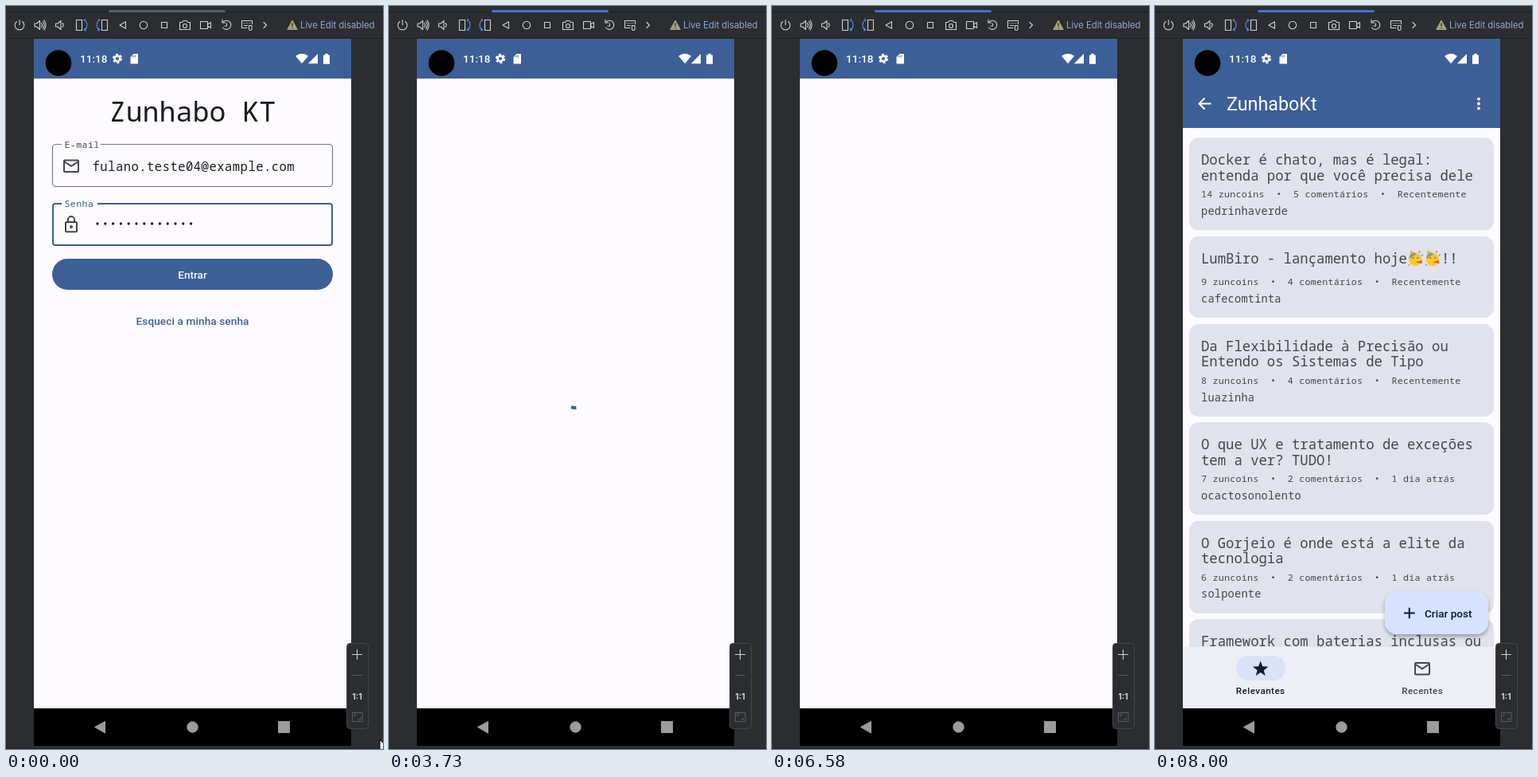
Recreate the animation shown at these times as an HTML page. Size 474 by 932 pixels, loop 9.45 s.

```html
<!DOCTYPE html>
<html lang="pt-BR">
<head>
<meta charset="utf-8">
<title>Zunhabo KT</title>
<style>
  html, body { margin: 0; width: 100%; height: 100%; overflow: hidden; background: #2b2d30; }
  svg { display: block; width: 474px; height: 932px; }
  text { white-space: pre; font: 500 13.6px Roboto, sans-serif; }
  .mid { text-anchor: middle; }
  .mono { font-family: "Noto Sans Mono", "DejaVu Sans Mono", monospace; font-weight: 400; }
  .label { font-size: 11.64px; letter-spacing: .39px; }
  .tab { font-size: 11.64px; letter-spacing: .45px; }
  .headline { font-size: 17.27px; }
  .meta { font-size: 11.64px; letter-spacing: .28px; }
  .author { font-size: 13.6px; letter-spacing: .24px; }
  .ide { font-family: Inter, sans-serif; font-weight: 400; }
  .line { fill: none; stroke: #ced0d6; stroke-width: 1.1; stroke-linejoin: round; stroke-linecap: round; }
  .blue { stroke: #548af7; }
</style>
</head>
<body>
<svg viewBox="0 0 474 932">
  <defs>
    <clipPath id="listArea"><rect x="35" y="153" width="399" height="651"/></clipPath>
    <filter id="shadow" x="-20%" y="-30%" width="140%" height="180%">
      <feDropShadow dx="0" dy="3" stdDeviation="2.6" flood-opacity=".3"/>
    </filter>
    <g id="mail" fill="none" stroke="#44474e" stroke-width="2" stroke-linejoin="round">
      <rect x="-9" y="-7" width="18" height="14.4" rx="1"/>
      <path d="M-9-5.5 0 .4 9-5.5"/>
    </g>
    <g id="party">
      <circle cx="10" cy="1.5" r="8.2" fill="#ffca28"/>
      <path d="M2 1 4-10 12-5Z" fill="#f5a33b"/>
      <path d="M2.7-3 9-7 11-5.6 2.3-.4Z" fill="#36a9d8"/>
      <path d="M5.5 0q1.6-2 3 0m3 0q1.6-2 3 0" fill="none" stroke="#6d4c28"/>
      <path d="M10 5 18 2.5 18.5 6.5Z" fill="#e8523f"/>
      <circle cx="15" cy="-8" r="1.1" fill="#e8523f"/>
      <circle cx="18.5" cy="-4" r="1" fill="#36a9d8"/>
      <circle cx="2" cy="8.5" r="1" fill="#7cb342"/>
    </g>
  </defs>

  <!-- IDE chrome -->
  <rect width="474" height="932" fill="#2b2d30"/>
  <path d="M0 7.5H474M0 40.5H474M0 931.5H474" stroke="#1e1f22"/>
  <rect id="focusBar" x="129" y="5" width="147" height="3" rx="1.5"/>
  <g class="line">
    <path d="M17 17.5v6M13.5 19.5a5.8 5.8 0 1 0 7 0"/>
    <path d="M36 22h2.5l4-3.5v11l-4-3.5H36ZM44.5 21.5q2 2.5 0 5M46.3 19.5q3.6 4.5 0 9M48 17.8q4 6.2 0 12.4"/>
    <path d="M62.5 22H65l4-3.5v11L65 26h-2.5ZM71 21.5q2.4 2.5 0 5"/>
    <path d="M88.500 17.500h7v13h-7Z"/>
    <path class="blue" d="M98 18q4 1 4 6t-4 6m0 0 2.500-2.500M98 30l2.500 1M98 18l2-1.500"/>
    <path d="M120.500 17.500h7v13h-7Z"/>
    <path class="blue" d="M118 18q-4 1-4 6t4 6m0 0-2.500-2.500M118 30l-2.500 1M118 18l-2-1.500"/>
    <path d="M143 24l7.500-4.200v8.400Z"/>
    <circle cx="173" cy="24" r="4.700"/>
    <path d="M195.500 20.500h7v7h-7Z"/>
    <path d="M218.500 20.500h3l1.500-2h4l1.500 2h3v9h-13Z"/>
    <circle cx="225" cy="25" r="2.500"/>
    <path d="M244.500 19.500h9v9h-9ZM253.500 23l4-2.500v7l-4-2.500"/>
    <path d="M273 20a5.600 5.600 0 1 1-.5 7M272 17v4h4M277.500 22v3h-2.500"/>
    <path d="M303 27.500h-6.500v-9h13v4M299 21.500h.2m2.300 0h.2m2.300 0h.2m2.300 0h.2M299.500 24.500h4M305.500 24.500h3.500v5q-1.700 2-3.500 0Z"/>
    <path d="M324 20.500l3.500 3.500-3.500 3.500"/>
  </g>
  <path d="M360 18 366.300 29.500H353.700Z" fill="#a3a17e" stroke="#a3a17e" stroke-linejoin="round"/>
  <path d="M360 21.500v4M360 27v1.300" stroke="#2b2d30" stroke-width="1.300"/>
  <text class="ide" x="370" y="28" style="font-size:11.3px" fill="#8fa9d6">Live Edit disabled</text>

  <!-- Phone -->
  <rect x="35" y="41" width="399" height="887"/>
  <rect x="35" y="91" width="399" height="790" fill="#fdfbff"/>
  <rect x="35" y="41" width="399" height="50" fill="#3d5f97"/>
  <circle cx="66" cy="71.500" r="16.300"/>
  <g fill="#fff">
    <text x="93" y="71">11:18</text>
    <g fill="none" stroke="#fff">
      <circle cx="140" cy="66" r="3.400" stroke-width="2.600"/>
      <circle cx="140" cy="66" r="5" stroke-width="2.400" stroke-dasharray="2.800 2.436"/>
    </g>
    <path d="M160.500 60h5.500v12.500h-9.500v-8.500Z"/>
    <path d="M372 72.200 364 62.800q8-6 16 0Z"/>
    <path d="M392 60v12.200h-12.200Z"/>
    <path d="M399 61.500h2.300v-1.700h3.400v1.700h2.300v11.200h-8Z"/>
  </g>
  <path d="M158.700 62.500v2m2-3v3m2-3v3" stroke="#3d5f97" stroke-width=".8"/>
  <g fill="#9c9c9c" stroke="#9c9c9c" stroke-linejoin="round">
    <path d="M111.500 904.500 124.500 897.500v14.500Z"/>
    <circle cx="234.500" cy="904.500" r="6.700"/>
    <rect x="342.500" y="897.500" width="14" height="14"/>
  </g>

  <g id="login">
    <text class="mono mid" x="234.500" y="144.500" style="font-size:34.95px" fill="#1b1b1f">Zunhabo KT</text>
    <rect x="58.500" y="173.500" width="352" height="53" rx="4" fill="none" stroke="#74777f" stroke-width="1.100"/>
    <path d="M70 173.500h49M70 248h45" stroke="#fdfbff" stroke-width="4"/>
    <text class="mono label" x="73.500" y="178" fill="#44474e">E-mail</text>
    <use href="#mail" x="82" y="200.500"/>
    <text class="mono" x="108.500" y="206.500" style="font-size:15.53px;letter-spacing:.485px" fill="#1b1b1f">fulano.teste04@example.com</text>
    <path d="M70 248h-8q-3 0-3 3v46q0 3 3 3h345q3 0 3-3v-46q0-3-3-3H115" fill="none" stroke="#3d5f97" stroke-width="2"/>
    <text class="mono label" x="73.500" y="252" fill="#3d5f97">Senha</text>
    <g fill="none" stroke="#44474e" stroke-width="2">
      <rect x="75" y="271" width="14" height="12.300" rx="1"/>
      <path d="M78 271v-3a4 4 0 0 1 8 0v3"/>
      <circle cx="82" cy="277" r="1"/>
    </g>
    <path d="M115 273h118" stroke="#1b1b1f" stroke-width="3.300" stroke-linecap="round" stroke-dasharray="0 9.800"/>
    <rect id="caret" x="235.500" y="262" width="2" height="22" fill="#3d5f97"/>
    <rect x="58" y="317" width="353" height="39" rx="19.500" fill="#3d5f97"/>
    <text class="mid" x="234.500" y="342" fill="#fff">Entrar</text>
    <text class="mid" x="234.500" y="400" fill="#3d5f97" letter-spacing=".1">Esqueci a minha senha</text>
  </g>

  <path id="spinner" fill="none" stroke="#3d5f97" stroke-width="3.900"/>

  <g id="home">
    <rect x="35" y="90" width="399" height="63" fill="#3d5f97"/>
    <path d="M70.500 122.500H56M62.500 115.500l-7 7 7 7" fill="none" stroke="#fff" stroke-width="2"/>
    <text x="90" y="131" style="font-size:23.3px;font-weight:400" fill="#fff">ZunhaboKt</text>
    <path d="M407 116.600v12" stroke="#fff" stroke-width="3.900" stroke-linecap="round" stroke-dasharray="0 5.900"/>
    <g clip-path="url(#listArea)"><g id="cards" fill="#44474e"></g></g>
    <rect x="35" y="804" width="399" height="77" fill="#edeef6"/>
    <rect x="102" y="815" width="62" height="31" rx="15.500" fill="#dae2f9"/>
    <path id="star" fill="#131c2b"/>
    <text class="mid tab" x="132.700" y="863" fill="#1b1b1f">Relevantes</text>
    <use href="#mail" x="336" y="831"/>
    <text class="mid tab" x="336.200" y="863" fill="#44474e">Recentes</text>
    <rect x="289" y="734" width="130" height="54" rx="15.500" fill="#d7e2ff" filter="url(#shadow)"/>
    <path d="M313 761.500h13.600M319.800 754.700v13.600" stroke="#001b3f" stroke-width="2"/>
    <text x="339" y="766.500" fill="#001b3f">Criar post</text>
  </g>

  <!-- Zoom panel -->
  <rect x="428.500" y="799.500" width="27" height="107" rx="4" fill="#2b2d30" stroke="#43454a"/>
  <path class="line" d="M435.500 813.500h12M441.500 807.500v12"/>
  <path d="M435.500 839.500h12M435.500 886.500h12.500v11h-12.500ZM438 891.500v-2.500h3M445.500 892.500v2.500h-3" fill="none" stroke="#5a5d63"/>
  <text class="ide mid" x="441.500" y="870" style="font-size:10.5px;font-weight:700" fill="#ced0d6">1:1</text>

  <path id="cursor" d="M0 0v15.500l3.600-3.300 2.600 6 2.700-1.200-2.600-5.800h5Z" fill="#fff" stroke="#111" stroke-width="1.100"/>
</svg>
<script>
const LOOP = 9450;
const LOADING_AT = 2510, BLANK_AT = 6580, HOME_AT = 6710, CARDS_AT = 7500;
const $ = id => document.getElementById(id);
const show = (id, on) => { $(id).style.display = on ? '' : 'none'; };
const clamp = x => Math.min(1, Math.max(0, x));

// Material standard easing: cubic-bezier(.4, 0, .2, 1)
function ease(x) {
  x = clamp(x);
  let lo = 0, hi = 1;
  for (let i = 0; i < 20; i++) {
    const s = (lo + hi) / 2, r = 1 - s;
    if (1.2 * r * r * s + .6 * r * s * s + s ** 3 < x) lo = s; else hi = s;
  }
  return 3 * (1 - lo) * lo * lo + lo ** 3;
}

const posts = [
  [165.3, 116, ['Docker é chato, mas é legal:', 'entenda por que você precisa dele'], 14, 5, 'Recentemente', 'pedrinhaverde'],
  [289, 102, ['LumBiro - lançamento hoje'], 9, 4, 'Recentemente', 'cafecomtinta'],
  [399, 116, ['Da Flexibilidade à Precisão ou', 'Entendo os Sistemas de Tipo'], 8, 4, 'Recentemente', 'luazinha'],
  [522.3, 116, ['O que UX e tratamento de exceções', 'tem a ver? TUDO!'], 7, 2, '1 dia atrás', 'ocactosonolento'],
  [645.8, 116, ['O Gorjeio é onde está a elite da', 'tecnologia'], 6, 2, '1 dia atrás', 'solpoente'],
  [769.2, 116, ['Framework com baterias inclusas ou'], 5, 2, '1 dia atrás', '']
];
const mono = (style, x, y, text) => `<text class="mono ${style}" x="${x}" y="${y}">${text}</text>`;

$('cards').innerHTML = posts.map(([top, height, lines, coins, comments, age, author]) =>
  `<rect x="43" y="${top}" width="383" height="${height}" rx="11.6" fill="#e0e2ec"/>` +
  lines.map((line, i) => mono('headline', 58, top + 33.8 + i * 19.4, line)).join('') +
  mono('meta', 58, top + height - 41, `${coins} zuncoins  •  ${comments} comentários  •  ${age}`) +
  mono('author', 58, top + height - 19.4, author)
).join('') +
  '<use href="#party" x="317.500" y="316.500"/><use href="#party" x="339" y="316.500"/>' +
  mono('headline', 360, 322.8, '!!');

$('star').setAttribute('d', 'M' + Array.from({ length: 10 }, (_, i) => {
  const r = i % 2 ? 4.3 : 10.2, a = (i * 36 - 90) * Math.PI / 180;
  return `${132.7 + r * Math.cos(a)} ${831.8 + r * Math.sin(a)}`;
}).join('L') + 'Z');

// Pointer stops: time, x, y
const stops = [[50, 470, 920], [180, 429, 266], [600, 429, 266], [930, 402, 250], [1150, 402, 250], [1660, 390, 332]];

function pointerAt(t) {
  let [, x, y] = stops[0];
  for (let i = 1; i < stops.length; i++) {
    const [t0, x0, y0] = stops[i - 1], [t1, x1, y1] = stops[i];
    if (t < t0) break;
    const p = clamp((t - t0) / (t1 - t0)), k = p * p * (3 - 2 * p);
    x = x0 + (x1 - x0) * k;
    y = y0 + (y1 - y0) * k;
  }
  return `translate(${x} ${y})`;
}

// Indeterminate ring: the head runs ahead for half a turn cycle, then the tail catches up.
function spinnerPath(elapsed) {
  const cycle = 1332, half = cycle / 2, radius = 17.5, capAngle = 12.7;
  const turn = Math.floor(elapsed / cycle), phase = elapsed % cycle;
  const head = 290 * ease(phase / half), tail = 290 * ease((phase - half) / half);
  const start = -90 + turn * 216 + 286 * phase / cycle + tail;
  const sweep = head - tail + capAngle;
  const point = deg => {
    const a = deg * Math.PI / 180;
    return `${234.5 + radius * Math.cos(a)} ${486.5 + radius * Math.sin(a)}`;
  };
  return `M${point(start)}A${radius} ${radius} 0 ${sweep > 180 ? 1 : 0} 1 ${point(start + sweep)}`;
}

function render(t) {
  const loading = t >= LOADING_AT && t < BLANK_AT;
  $('focusBar').setAttribute('fill', t < 2480 ? '#5a5d63' : '#456fdc');
  show('login', t < LOADING_AT);
  show('caret', t >= 130 && (t - 130) % 1005 < 520);
  show('cursor', t < LOADING_AT);
  $('cursor').setAttribute('transform', pointerAt(t));
  show('spinner', loading);
  if (loading) $('spinner').setAttribute('d', spinnerPath((t - LOADING_AT) * .974));
  show('home', t >= HOME_AT);
  $('cards').setAttribute('opacity', t < CARDS_AT ? 0 : ease((t - 7305) / 695));
}

const began = performance.now();
function tick() {
  render((performance.now() - began) % LOOP);
  requestAnimationFrame(tick);
}
tick();
</script>
</body>
</html>
```
